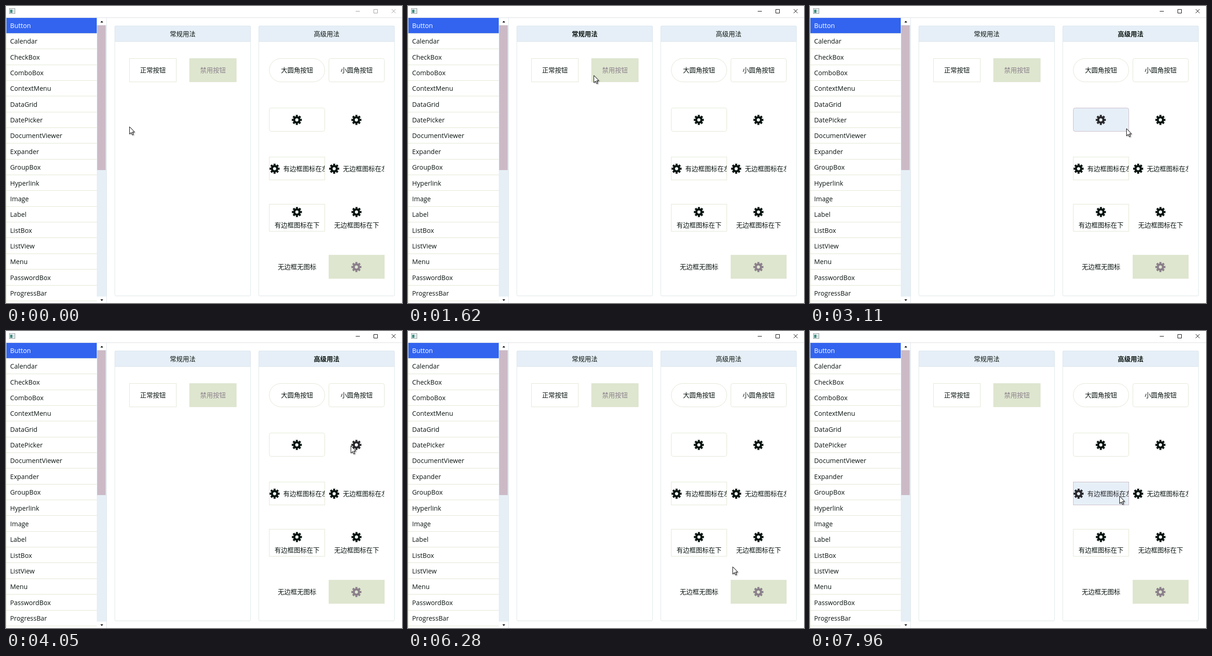
These frames come from a looping animation (864x648 px, 8000 ms). An HTML page:

```html
<!DOCTYPE html>
<html lang="zh-CN">
<head>
<meta charset="utf-8">
<style>
  html, body { margin: 0; width: 100%; height: 100%; overflow: hidden; background: #fff; }
  #stage { display: block; width: 864px; height: 648px; }
  text { font: 14px 'Noto Sans CJK SC', 'Noto Sans CJK', 'Noto Sans', sans-serif; fill: #0a1410; }
  .list text { font: 14.2px 'Open Sans', 'Noto Sans', sans-serif; }
  .bold { font-weight: bold; }
  .chrome { fill: none; stroke: #999; }
  .active .chrome { stroke: #000; }
  .button { color: #0a1612; }
  .button text { fill: currentColor; }
  .button rect { fill: #fff; stroke: #e0e7d3; }
  .button.plain rect { fill: none; stroke: none; }
  .button.disabled { color: #8b808b; }
  .button.disabled rect { fill: #dee6cf; stroke: #dee6cf; }
  .button.hover { color: #29292e; }
  .button.hover:not(.plain) rect { fill: #e6eff7; stroke: #cbbac6; }
  .button.pressed { color: #fff; }
  .button.pressed:not(.plain) rect { fill: #3264f0; stroke: #3264f0; }
  .button.plain.pressed { color: #3264f0; }
</style>
</head>
<body>
<svg id="stage" viewBox="0 0 864 648">
  <defs>
    <g id="gear" fill="none" stroke="currentColor">
      <circle r="5.9" stroke-width="4.8"/>
      <circle r="9.1" stroke-width="3.8" pathLength="16" stroke-dasharray="1.2 .8" stroke-dashoffset=".6"/>
    </g>
    <filter id="shadow" x="-50%" y="-50%" width="200%" height="200%">
      <feDropShadow dx="1.5" dy="1.5" stdDeviation=".9" flood-opacity=".4"/>
    </filter>
  </defs>
  <rect width="864" height="648" fill="#fff"/>

  <g id="titlebar">
    <rect x="7.5" y="5.5" width="12" height="11" fill="#f4f6f6" stroke="#8b9696"/>
    <rect x="9" y="8" width="5" height="7" fill="#3f8f83"/>
    <path d="M15.5 8v7M17.5 8v7" stroke="#c5cccc"/>
    <path d="M0 25.5H864" stroke="#dcdfe3"/>
    <path class="chrome" d="M763 11.5h9M802.5 7.5h8v8h-8zM841.5 7l8.5 8.5M850 7l-8.5 8.5"/>
  </g>

  <g class="list" id="list"></g>

  <g id="scrollbar">
    <rect x="198" y="26" width="21" height="622" fill="#e6eff6"/>
    <path d="M198 26h21v16h-21zM198 634h21v14h-21z" fill="#fff"/>
    <rect x="199" y="42" width="18.5" height="316" fill="#cbbac6"/>
    <path d="M206 36l3-3.5 3 3.5zM206 640l3 3.5 3-3.5z" fill="#000"/>
    <path d="M219.5 26V648" stroke="#dfe7ea"/>
  </g>

  <g id="panels"></g>
  <g id="buttons"></g>
  <path id="cursor" d="M.5 .5V16.3L4.2 12.9 6.6 18.3 8.9 17.3 6.6 12H11.4Z"
        fill="#fff" stroke="#000" filter="url(#shadow)"/>
</svg>
<script>
const LOOP = 8000, STEP = 60;
const $ = id => document.getElementById(id);

function add(parent, tag, attrs = {}, content) {
  const node = document.createElementNS('http://www.w3.org/2000/svg', tag);
  for (const key in attrs) node.setAttribute(key, attrs[key]);
  if (content) node.textContent = content;
  return parent.appendChild(node);
}

const items = ['Button', 'Calendar', 'CheckBox', 'ComboBox', 'ContextMenu', 'DataGrid',
  'DatePicker', 'DocumentViewer', 'Expander', 'GroupBox', 'Hyperlink', 'Image', 'Label',
  'ListBox', 'ListView', 'Menu', 'PasswordBox', 'ProgressBar'];
add($('list'), 'path', { d: 'M.5 26V648', stroke: '#e0e7d3' });
items.forEach((name, i) => {
  const y = 26 + i * 34.35;
  add($('list'), 'path', { d: `M1 ${Math.floor(y + 33.4) + .5}H198`, stroke: '#dfe6d1' });
  if (!i) add($('list'), 'rect', { x: 1, y: 26, width: 197, height: 33.3, fill: '#3264f0' });
  const label = add($('list'), 'text', { x: 9, y: Math.round(y + 22) }, name);
  if (!i) label.style.fill = '#fff';
});

const titles = [[237, '常规用法'], [551, '高级用法']].map(([x, title]) => {
  const edge = { x: x + .5, y: 43.5, width: 296, rx: 2.5, stroke: '#dde6e6' };
  add($('panels'), 'rect', { ...edge, height: 589, fill: '#fff' });
  add($('panels'), 'path', {
    d: `M${x + .5} 77.5V46q0-2.5 2.5-2.5h291q2.5 0 2.5 2.5V77.5z`, fill: '#e6eff7', stroke: '#d9e5ec'
  });
  return add($('panels'), 'text', { x: x + 148.5, y: 66, 'text-anchor': 'middle' }, title);
});

// Layouts: text, gear, left (gear beside text), below (text under gear)
const buttons = [
  { x: 269, y: 114, w: 103, panel: 0, text: '正常按钮' },
  { x: 400, y: 114, w: 103, panel: 0, text: '禁用按钮', kind: 'disabled' },
  { x: 574, y: 114, text: '大圆角按钮', r: 25.5 },
  { x: 704, y: 114, text: '小圆角按钮', r: 4 },
  { x: 574, y: 222, layout: 'gear', r: 4 },
  { x: 704, y: 222, layout: 'gear', kind: 'plain' },
  { x: 574, y: 329, h: 51, layout: 'left', text: '有边框图标在左' },
  { x: 704, y: 329, h: 51, layout: 'left', text: '无边框图标在左', kind: 'plain' },
  { x: 574, y: 432, h: 60, layout: 'below', text: '有边框图标在下' },
  { x: 704, y: 432, h: 60, layout: 'below', text: '无边框图标在下', kind: 'plain' },
  { x: 574, y: 543, text: '无边框无图标', kind: 'plain' },
  { x: 704, y: 543, layout: 'gear', kind: 'disabled' }
].map(b => ({ w: 122, h: 52, r: 0, panel: 1, kind: '', layout: 'text', ...b }));

for (const b of buttons) {
  const { x, y, w, h, layout } = b;
  b.node = add($('buttons'), 'svg', { x, y, width: w, height: h, overflow: 'hidden' });
  add(b.node, 'rect', { x: .5, y: .5, width: w - 1, height: h - 1, rx: b.r });
  const gear = { gear: [w / 2 - .5, 26.5], left: [12, 26], below: [w / 2 - .3, 17.5] }[layout];
  if (gear) add(b.node, 'use', { href: '#gear', x: gear[0], y: gear[1] });
  if (!b.text) continue;
  // Keep the clipped label inside the border
  const box = add(b.node, 'svg', { width: layout === 'left' ? w - 1 : w, height: h });
  const [tx, ty] = { text: [w / 2, 31.3], left: [31, 31], below: [w / 2, 51] }[layout];
  add(box, 'text', { x: tx, y: ty, 'text-anchor': layout === 'left' ? 'start' : 'middle' }, b.text);
}

// Pointer strokes: [time, x, y], at rest on both ends
const moves = [
  [[0, 269, 263], [360, 304, 207], [720, 328, 152]],
  [[1390, 328, 152], [1750, 530, 149], [2110, 717, 146], [2230, 757, 144], [2290, 768, 142]],
  [[2560, 768, 142], [2860, 745, 225], [3060, 700, 266], [3300, 650, 251]],
  [[3450, 650, 251], [3750, 684, 254], [3810, 710, 253], [4050, 752, 250], [4230, 764, 253]],
  [[4300, 764, 253], [4480, 752, 300], [4660, 722, 374], [4840, 674, 407], [5020, 745, 440],
    [5140, 767, 451], [5260, 768, 452]],
  [[5860, 768, 452], [6160, 735, 508], [6400, 680, 509], [6700, 647, 475]],
  [[7420, 647, 475], [7600, 680, 438], [7720, 711, 408], [7840, 690, 378], [7960, 675, 360]]
];
const presses = [[1180, 1240], [5200, 5920], [6760, 7220]];

function slope(path, i, axis) {
  if (i === 0 || i === path.length - 1) return 0;
  const a = path[i - 1], b = path[i + 1];
  return (b[axis] - a[axis]) / (b[0] - a[0]);
}

function pointerAt(time) {
  const path = moves.filter(m => m[0][0] <= time).pop();
  const start = path[0][0], last = path[path.length - 1];
  if (time >= last[0]) return last.slice(1);
  const t = start + Math.floor((time - start) / STEP) * STEP;
  const i = path.findIndex((p, k) => t < path[k + 1][0]);
  const a = path[i], b = path[i + 1], span = b[0] - a[0], u = (t - a[0]) / span;
  return [1, 2].map(axis => Math.round(
    a[axis] * (1 + 2 * u) * (1 - u) ** 2 + b[axis] * u * u * (3 - 2 * u) +
    span * (slope(path, i, axis) * u * (1 - u) ** 2 - slope(path, i + 1, axis) * u * u * (1 - u))));
}

function render(time) {
  const [px, py] = pointerAt(time);
  const down = presses.some(([from, to]) => time >= from && time < to);
  const over = buttons.find(b => px >= b.x && px < b.x + b.w && py >= b.y && py < b.y + b.h);
  for (const b of buttons) {
    const state = b !== over || b.kind === 'disabled' ? '' : down ? 'pressed' : 'hover';
    b.node.setAttribute('class', `button ${b.kind} ${state}`);
  }
  titles.forEach((title, i) => title.classList.toggle('bold', !!over && over.panel === i));
  $('titlebar').classList.toggle('active', time >= 1180);
  $('cursor').setAttribute('transform', `translate(${px} ${py})`);
}

let origin;
function tick(now) {
  origin ??= now;
  render((now - origin) % LOOP);
  requestAnimationFrame(tick);
}
render(0);
requestAnimationFrame(tick);
</script>
</body>
</html>
```
